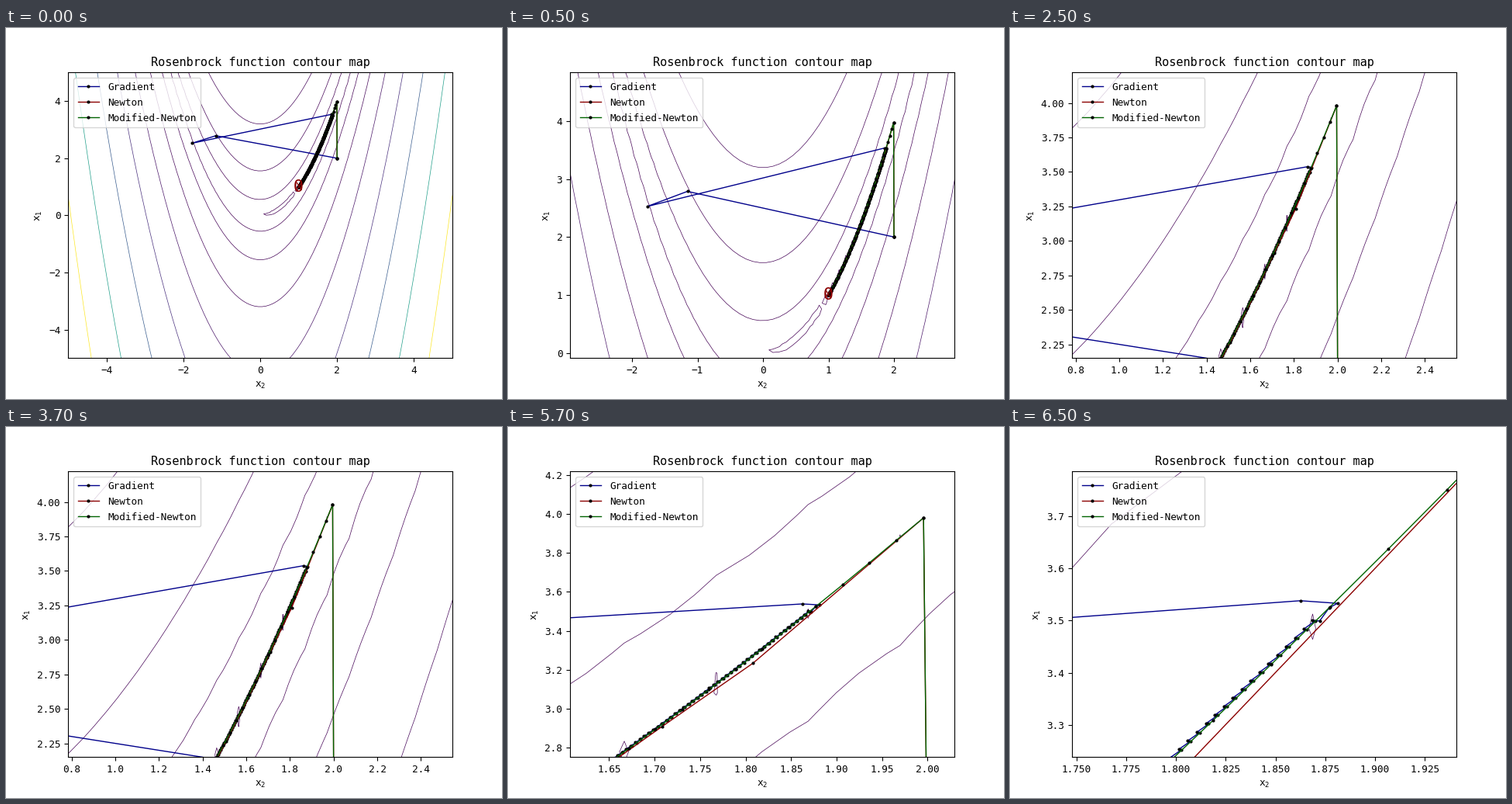
Write a matplotlib script that moves like this. It is 640 px wide and 478 px high and loops after 8000 ms.

```python
import numpy as np
import matplotlib.pyplot as plt
from matplotlib.animation import FuncAnimation

SMALL, LARGE = 9.15, 11
LOOP, STEP, HOLD, FIRST_HOLD = 8000, 500, 2000, 500
plt.rcParams.update({
    "font.family": "DejaVu Sans Mono",
    "mathtext.default": "regular",
    "xtick.labelsize": SMALL,
    "ytick.labelsize": SMALL,
    "axes.labelsize": SMALL,
    "axes.titlesize": LARGE,
})

# x and y limits of each successive zoom
VIEWS = [
    ((-5, 5), (-5, 5)),
    ((-2.947, 2.923), (-0.0925, 4.840)),
    ((0.784, 2.5438), (2.1497, 4.2207)),
    ((1.607, 2.0294), (2.7505, 4.2183)),
    ((1.7478, 1.9409), (3.2386, 3.7852)),
]
START, CREST = (2, 2), (1.9955, 3.9802)


def rosenbrock(x, y):
    return (1 - x) ** 2 + 100 * (y - x**2) ** 2


def gradient_path():
    """A few wild jumps, then a fine zigzag down the valley."""
    jumps = [START, (-1.154, 2.788), (-1.769, 2.527), (1.8625, 3.538),
             (1.8812, 3.533), (1.877, 3.5245), (1.8722, 3.4993)]
    y = np.arange(3.5, 1, -0.01644)
    x = np.sqrt(y - 0.0085)
    zigzag = np.stack([x, y, x + 0.0015, y - 0.0003], axis=1).reshape(-1, 2)
    return np.vstack([jumps, zigzag])


def newton_path():
    path = [START, CREST, (1.8082, 3.234)]
    x, y = path[-1]
    while x - 1 > 1e-3:
        t = y - x * x
        dx = (1 - x) / (1 - 200 * t)
        dx = max(dx, -0.1)  # damped while far from the minimum
        x, y = x + dx, y + 2 * x * dx - t
        path.append((x, y))
    return np.array(path)


def modified_path():
    """Even steps along the valley floor."""
    x = np.arange(1.9655, 1, -0.0294)
    return np.vstack([START, CREST, np.column_stack([x, x**2 + 0.0015]), (1, 1)])


fig, ax = plt.subplots(figsize=(6.4, 4.78), dpi=100)
grid = np.linspace(-5, 5, 100)
X, Y = np.meshgrid(grid, grid)
ax.contour(X, Y, rosenbrock(X, Y), levels=np.arange(10) ** 5, linewidths=0.5)

for path, color, label in [
    (gradient_path(), "darkblue", "Gradient"),
    (newton_path(), "darkred", "Newton"),
    (modified_path(), "darkgreen", "Modified-Newton"),
]:
    ax.plot(*path.T, color=color, lw=1, marker=".", ms=4,
            mfc="black", mec="black", label=label)

# ring and cross on the minimum
for glyph, size in [("O", 15.3), ("X", 10)]:
    ax.text(1, 1, glyph, color="darkred", size=size,
            ha="center", va="center", clip_on=True)

ax.set_title("Rosenbrock function contour map")
ax.set_xlabel("$x_2$")
ax.set_ylabel("$x_1$")
legend = ax.legend(loc="upper left")
for text in legend.get_texts():
    text.set_fontsize(SMALL)


def update(i):
    xlim, ylim = VIEWS[(i * STEP + HOLD - FIRST_HOLD) // HOLD]
    ax.set_xlim(xlim)
    ax.set_ylim(ylim)
    return []


anim = FuncAnimation(fig, update, frames=LOOP // STEP, interval=STEP,
                     init_func=lambda: update(0), repeat=True, repeat_delay=0)
plt.show()
```
